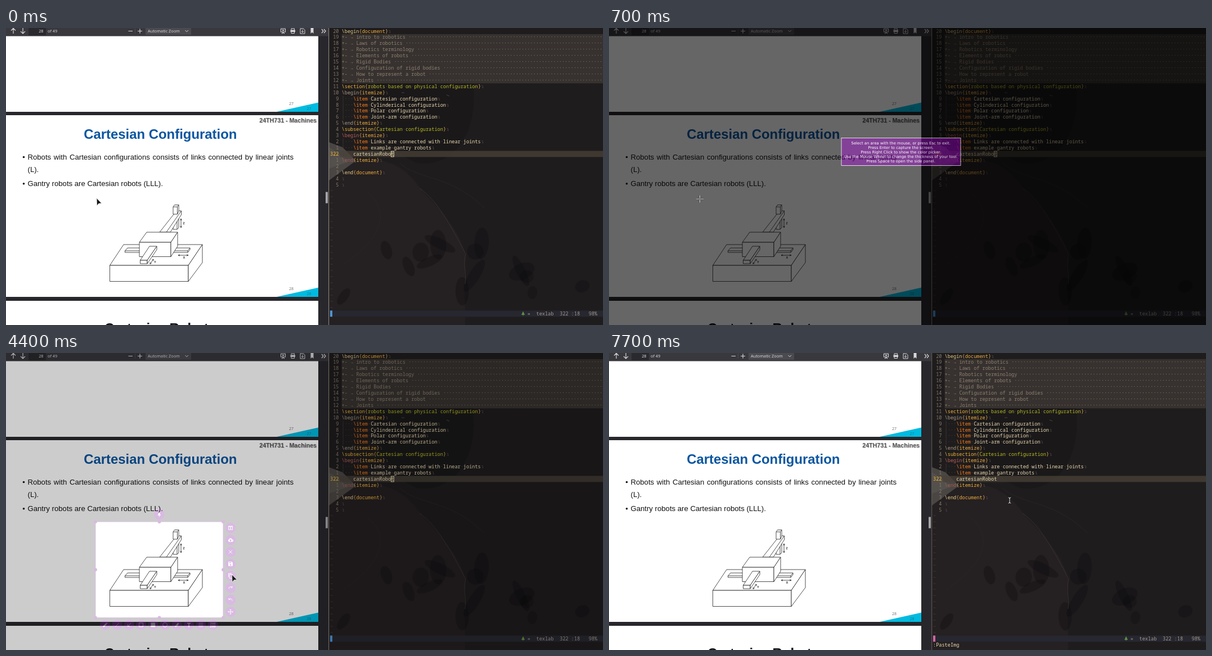
An HTML page with a canvas that plays this animation: 1061 by 528 pixels, repeating every 8000 ms.

```html
<!DOCTYPE html>
<html lang="en">
<head>
<meta charset="utf-8">
<title>Slides and notes</title>
<style>
html, body { margin: 0; width: 100%; height: 100%; overflow: hidden; background: #1e1b1c; }
canvas { display: block; }
</style>
</head>
<body>
<canvas id="stage" width="1061" height="528"></canvas>
<script>
const W = 1061, H = 528, LOOP = 8000;
const stage = document.getElementById('stage').getContext('2d');
const layer = document.createElement('canvas');
layer.width = W;
layer.height = H;
const over = layer.getContext('2d');
let g = stage;

const SANS = '"Liberation Sans", Arial, sans-serif';
const UI = '"Noto Sans", sans-serif';
const MONO = '8.59px "Noto Sans Mono", "DejaVu Sans Mono", monospace';
const PURPLE = '#740096';

function rect(x, y, w, h, color) {
  g.fillStyle = color;
  g.fillRect(x, y, w, h);
}
function text(s, x, y, font, color, align = 'left') {
  g.font = font;
  g.fillStyle = color;
  g.textAlign = align;
  g.fillText(s, x, y);
}
function poly(pts, fill, stroke, width = 1) {
  g.beginPath();
  for (let i = 0; i < pts.length; i += 2) g.lineTo(pts[i], pts[i + 1]);
  g.closePath();
  if (fill) { g.fillStyle = fill; g.fill(); }
  if (stroke) { g.strokeStyle = stroke; g.lineWidth = width; g.stroke(); }
}
function path(d, color, width = 1) {
  g.strokeStyle = color;
  g.lineWidth = width;
  g.stroke(new Path2D(d));
}
function disc(x, y, r, color) {
  g.fillStyle = color;
  g.beginPath();
  g.arc(x, y, r, 0, 7);
  g.fill();
}

// ---- slide viewer ----
function toolbar() {
  const c = '#d8d8da';
  rect(0, 0, 573, 14.5, '#38383d');
  rect(40, -2, 31, 15, '#2a2a2e');
  rect(248, -2, 81, 14, '#4a4a4f');
  path('M13 10V1M9 4.5L13 .5L17 4.5M30 0V9.5M26 6L30 10L34 6', c, 1.2);
  path('M217.5 5.5H225M234 5.5H242M238 1.5V9.5', c, 1.2);
  path('M229.5 1V10', '#55555a', 0.7);
  path('M318.5 4L321.2 6.8L324 4', c);
  path('M561 2L564 5.5L561 9M565 2L568 5.5L565 9', c, 1.2);
  text('28', 66.5, 8, '7.3px ' + UI, c, 'right');
  text('of 49', 74, 8, '7.3px ' + UI, c);
  text('Automatic Zoom', 252, 8, '7.3px ' + UI, c);
  path('M488.5 1.5H496.5V7H488.5ZM492.5 7V9M490 10L492.5 8L495 10', c, 1.1);
  poly([491.3, 2.5, 495, 4.3, 491.3, 6], c);
  path('M507 3.5V1H512.5V3.5M507 6.5H512.5V9.5H507Z', c);
  rect(505.5, 3.5, 8.5, 3.5, c);
  path('M523 1H528.5L531 3.5V10H523ZM527 3V8M525 6L527 8L529 6', c);
  poly([541.5, 0, 546.5, 0, 546.5, 10, 544, 7.5, 541.5, 10], c);
}
function justify(s, x, right, y, font) {
  g.font = font;
  const words = s.split(' ');
  const widths = words.map(w => g.measureText(w).width);
  const gap = (right - x - widths.reduce((a, b) => a + b)) / (words.length - 1);
  words.forEach((w, i) => {
    text(w, x, y, font, '#111', 'left');
    x += widths[i] + gap;
  });
}
function corner(n, bottom) {
  poly([481, bottom, 555, bottom - 16.5, 555, bottom], '#00bbe0');
  text(n, 507, bottom - 12, '7px ' + UI, '#777', 'center');
  text(n, 538.5, bottom - 3.5, '7px ' + UI, '#087f9c', 'center');
}
function robot() {
  const box = (...p) => poly(p, '#fff', '#222', 0.8);
  box(184.5, 422, 209, 385, 349, 385, 324, 422);
  box(184.5, 422, 324, 422, 324, 450.5, 184.5, 450.5);
  box(324, 422, 349, 385, 349, 417, 324, 450.5);
  box(211.5, 396, 216, 391, 238, 391, 238, 399, 211.5, 399);
  path('M211.5 396H238', '#222', 0.8);
  box(298, 396, 302, 391, 327, 391, 327, 394, 323, 399, 290, 399, 290, 396);
  path('M290 396H323V399M323 396L327 391', '#222', 0.8);
  box(297, 338, 307, 326, 307, 355, 304, 358, 297, 358);
  path('M304 330V358', '#222', 0.8);
  box(273, 363, 303, 325, 311.5, 325, 311.5, 332, 292, 363);
  path('M285 363L311.5 325', '#222', 0.8);
  box(297, 318, 299.5, 314.5, 307, 314.5, 307, 326, 304.5, 331, 297, 331);
  path('M297 318H304.5V331M304.5 318L307 314.5', '#222', 0.8);
  box(237, 381, 250, 363, 305, 363, 293, 381);
  box(237, 381, 293, 381, 293, 406.5, 237, 406.5);
  box(293, 381, 305, 363, 305, 388, 293, 406.5);
  box(238.5, 413, 255, 388, 268, 388, 251, 413);
  box(238.5, 413, 251, 413, 251, 419, 238.5, 419);
  box(251, 413, 268, 388, 268, 394, 251, 419);
  path('M311 339V355M309.8 342L311 339L312.2 342M309.8 352L311 355L312.2 352', '#222', 0.8);
  path('M306 404H324M309 402.8L306 404L309 405.2M321 402.8L324 404L321 405.2', '#222', 0.8);
  path('M256 419.5L262 411M256 416.5V419.5L258.7 418M259.5 412.5L262 411V414', '#222', 0.8);
  const f = 'bold 5px ' + SANS;
  text('Z', 316, 349, f, '#222', 'center');
  text('X', 316.5, 410, f, '#222', 'center');
  text('Y', 265, 418, f, '#222', 'center');
}
function slides() {
  rect(0, 0, 573, H, '#28272c');
  rect(0, 14, 555, 135, '#fff');
  rect(0, 155, 555, 323, '#fff');
  rect(0, 485, 555, 43, '#fff');
  rect(568, 291.5, 4, 20, '#a5a5a8');
  corner('27', 149);
  corner('28', 478);
  const head = '24TH731 - Machines', hf = 'bold 10.65px ' + SANS;
  text(head, 553, 169, hf, '#ccc', 'right');
  text(head, 552, 168.3, hf, '#555', 'right');
  text('Cartesian Configuration', 274.3, 196.5, 'bold 23.9px ' + SANS, '#0a56a0', 'center');
  const f = '13.15px ' + SANS;
  justify('Robots with Cartesian configurations consists of links connected by linear joints',
    38.5, 511, 233.8, f);
  text('(L).', 38.5, 256.3, f, '#111');
  text('Gantry robots are Cartesian robots (LLL).', 38.5, 281, f, '#111');
  disc(31.5, 229.5, 1.8, '#111');
  disc(31.5, 276.7, 1.8, '#111');
  robot();
  text('Cartesian Robots', 274, 542, 'bold 23.9px ' + SANS, '#111', 'center');
  toolbar();
}

// ---- editor ----
const CW = 5.155, LH = 10.92;
const col = c => 576 + c * CW;
const row = r => 5.5 + r * LH;
const mono = (s, c, r, color) => text(s, col(c), row(r) + 3, MONO, color);

const folds = ['intro to robotics', 'Laws of robotics', 'Robotics terminology',
  'Elements of robots', 'Rigid Bodies', 'Configuration of rigid bodies',
  'How to represent a robot', 'Joints'];
const code = {
  0: '\\begin{document}',
  9: '\\section{robots based on physical configuration}',
  10: '\\begin{itemize}',
  11: '\\item Cartesian configuration',
  12: '\\item Cylinderical configuration',
  13: '\\item Polar configuration',
  14: '\\item Joint-arm configuration',
  15: '\\end{itemize}',
  16: '\\subsection{Cartesian configuration}',
  17: '\\begin{itemize}',
  18: '\\item Links are connected with linear joints',
  19: '\\item example gantry robots',
  21: '\\end{itemize}',
  23: '\\end{document}',
  24: '',
  25: ''
};
const cmdColor = { 10: '#a89984', 15: '#a89984', 17: '#b9615a', 21: '#a25a56' };

function codeLine(s, r) {
  const item = s.startsWith('\\item');
  const start = item ? 8 : 4;
  if (s) {
    const [, cmd, rest] = s.match(/^(\\\w+)(.*)$/);
    const after = start + cmd.length;
    if (item) {
      mono('│···', 4, r, '#4a4441');
      mono(cmd, start, r, '#fe8019');
      mono(rest, after, r, '#ebdbb2');
    } else {
      const sect = cmd.endsWith('section');
      mono(cmd, start, r, sect ? '#f0b63a' : cmdColor[r] || '#e8cf8a');
      mono('{', after, r, '#d8a657');
      mono(rest.slice(1, -1), after + 1, r, sect ? '#b8bb26' : '#f0b040');
      mono('}', after + rest.length - 1, r, '#d8a657');
    }
    mono(s.replace(/./g, c => c === ' ' ? '·' : ' '), start, r, '#5a524c');
  }
  mono('↴', start + s.length, r, '#514a46');
}
function wallpaper() {
  rect(573, 0, 488, H, '#1f1c1d');
  g.fillStyle = '#252021';
  g.fill(new Path2D('M573 250C650 220 700 230 740 290C790 340 815 380 817 410C812 450 817 490 816 528H573Z'));
  g.fillStyle = '#1a1819';
  g.fill(new Path2D('M660 98C640 160 680 220 730 240C800 250 840 180 830 98Z'));
  let seed = 7;
  const rnd = () => (seed = seed * 16807 % 2147483647) / 2147483647;
  g.fillStyle = 'rgba(10,9,11,.28)';
  for (let i = 0; i < 16; i++) {
    g.beginPath();
    g.ellipse(600 + rnd() * 460, 330 + rnd() * 160, 10 + rnd() * 24, 6 + rnd() * 9, rnd() * 3, 0, 7);
    g.fill();
  }
  path('M735 285C765 305 790 350 817 402C812 420 818 430 816 455', '#373031', 1);
  path('M640 290C690 330 660 380 600 420M700 240C730 270 790 260 850 320', '#2a2526', 1);
  path('M703 115H708M783 119L788 121', '#4c4543', 1);
  poly([574, 203, 598, 212, 622, 236, 600, 252, 574, 271], '#4a4643');
  poly([574, 212, 590, 222, 608, 238, 574, 250], '#54504c');
}
function editor(t) {
  const focused = t >= 5300, command = t >= 6600;
  wallpaper();
  rect(573, 0, 1.2, H, focused ? '#5c554e' : '#858078');
  rect(col(4), row(0.5), W, 8 * LH, '#37322f');
  rect(col(3.3), row(19.5), W, LH, 'rgba(72,66,56,.75)');

  for (let r = 0; r < 26; r++) {
    const here = r === 20;
    text(here ? 322 : Math.abs(20 - r), col(3), row(r) + 3, MONO, here ? '#fabd2f' : '#857a6c', 'right');
    if (r in code) codeLine(code[r], r);
  }
  for (let r = 26; r < 46; r++) mono('~', 0, r, '#4a4340');
  folds.forEach((s, i) => {
    const c = '#8d8172', end = 9 + s.length;
    mono('+-', 4, i + 1, c);
    mono('→', 7, i + 1, c);
    mono(s, 9, i + 1, c);
    mono('·'.repeat(95 - end), end + 1, i + 1, c);
  });
  mono('│', 4, 20, '#4a4441');
  mono('cartesianRobot', 8, 20, '#ebdbb2');

  const x = col(21), y = row(19.5);
  if (!focused) {
    g.strokeStyle = '#ebdbb2';
    g.lineWidth = 1;
    g.strokeRect(x + 0.2, y + 0.7, CW - 0.4, LH - 1.2);
  } else if (t < 5800 || (t >= 6200 && !command)) {
    rect(x, y, CW, LH, '#f2e9d5');
    mono('t', 21, 20, '#282828');
  }

  rect(575, 502.3, W, 11, '#272730');
  rect(576, 502.3, 4, 11, command ? '#d067a4' : '#4f94d4');
  poly([919, 503.5, 922, 510, 916, 510], '#5f8f4a');
  rect(918.5, 510, 1, 1.5, '#5f8f4a');
  const sf = '#a39a8d', sy = 510.5;
  text('∝', 926.5, sy, MONO, sf);
  text('texlab', 942.5, sy, MONO, sf);
  text('322 :18', 984, sy, MONO, sf);
  text('98%', 1035.5, sy, MONO, sf);
  if (command) {
    const s = t < 7000 ? ':' : ':PasteImg';
    text(s, 576, 521.5, MONO, '#ebdbb2');
    if (t < 7700) rect(col(s.length), 513.3, CW, LH, '#f2e9d5');
  }
}

// ---- screenshot tool ----
const help = ['Select an area with the mouse, or press Esc to exit.',
  'Press Enter to capture the screen.',
  'Press Right Click to show the color picker.',
  'Use the Mouse Wheel to change the thickness of your tool.',
  'Press Space to open the side panel.'];

// icons on a 24 unit grid: f = filled, s = stroked
const pin = 'fM8 3h8v2h-1v6l3 3v2h-5v6l-1 1-1-1v-6H6v-2l3-3V5H8z';
const sideIcons = [
  'fM3 4h18v16H3zM5 8v10h14V8zM12 9l4 4h-3v4h-2v-4H8z',
  'fM19 10a7 7 0 0 0-13-1a6 6 0 0 0 0 11h13a5 5 0 0 0 0-10zM12 9l5 5h-3v4h-4v-4H7z',
  'sM5 5L19 19M19 5L5 19',
  'fM3 3h14l4 4v14H3zM6 5v4h9V5zM12 13a3 3 0 1 0 .1 0z',
  'sM8 6h12v16H8zM4 17V2h12',
  'sM19 5v6h-6M18 10c-5-5-12-3-13 6',
  'sM5 5v6h6M6 10c5-5 12-3 13 6',
  'sM12 2v20M2 12h20M9 5l3-3 3 3M9 19l3 3 3-3M5 9l-3 3 3 3M19 9l3 3-3 3'];
const drawIcons = [
  'fM3 21v-4L15 5l4 4L7 21zM16 4l2-2 4 4-2 2z',
  'sM5 19L19 5',
  'sM19 5L6 18M6 9v9h9',
  'sM4 4h16v16H4z',
  'fM3 3h18v18H3z',
  'sM12 3a9 9 0 1 0 .1 0z',
  'fM4 20l2-6 5 4-2 2zM7 13L16 3l5 4-8 10z',
  'fM5 4h14v4h-5v13h-4V8H5z',
  'pM4 4h16v16H4zM9 4v16M15 4v16M4 9h16M4 15h16',
  ''];

function button(x, y, icon, size) {
  g.save();
  g.translate(x, y);
  g.scale(size, size);
  disc(0, 0, 9.2, PURPLE);
  if (icon) {
    const p = new Path2D(icon.slice(1));
    g.scale(0.43, 0.43);
    g.translate(-12, -12);
    g.fillStyle = g.strokeStyle = icon[0] === 'p' ? 'rgba(255,255,255,.45)' : '#fff';
    g.lineWidth = 2.2;
    if (icon[0] === 'f') g.fill(p, 'evenodd');
    else g.stroke(p);
  } else {
    text('398', 0, -0.5, 'bold 6px ' + SANS, '#fff', 'center');
    text('299', 0, 5, 'bold 6px ' + SANS, '#fff', 'center');
  }
  g.restore();
}
function selection(x, y, w, h) {
  g.clearRect(x, y, w, h);
  g.strokeStyle = PURPLE;
  g.lineWidth = 0.8;
  g.strokeRect(x, y, w, h);
  for (let i = 0; i < 3; i++)
    for (let j = 0; j < 3; j++)
      if (i !== 1 || j !== 1) disc(x + w * i / 2, y + h * j / 2, 2.9, PURPLE);
}
function helpBox() {
  rect(413, 195.5, 212, 49, 'rgba(116,0,150,.706)');
  g.strokeStyle = '#fff';
  g.lineWidth = 0.8;
  g.strokeRect(413, 195.5, 212, 49);
  help.forEach((s, i) =>
    text(s, 518.7, 206.8 + i * 8, '6.85px "DejaVu Sans", sans-serif', '#fff', 'center'));
}
// eased drag position from 1100 to 1700 ms
function drag(t, kx, ky) {
  const p = Math.min(1, Math.max(0, (t - 1100) / 600));
  return [159 + 227 * (1 - (1 - p) ** kx), 300 + 170.5 * (1 - (1 - p) ** ky)];
}
function capture(t) {
  g = over;
  g.clearRect(0, 0, W, H);
  rect(0, 0, W, H, 'rgba(0,0,0,.745)');
  if (t < 1100) helpBox();
  else {
    const [x, y] = drag(t, 1.76, 2.78);
    selection(159, 300, x - 159, y - 300);
  }
  if (t >= 2300) {
    const size = Math.min(1, 0.35 + (t - 2300) / 100 * 0.35);
    button(272.3, 287, pin, size);
    sideIcons.forEach((d, i) => button(399, 311 + i * 21.3, d, size));
    drawIcons.forEach((d, i) => button(176.3 + i * 21.25, 483.3, d, size));
  }
  g = stage;
  g.globalAlpha = t >= 4400 ? 0.268 : Math.min(1, (t - 400) / 100 * 0.268);
  g.drawImage(layer, 0, 0);
  g.globalAlpha = 1;
}

// ---- pointer ----
function arrow(x, y) {
  poly([x, y, x + 0.6, y + 13.5, x + 3.8, y + 9.6, x + 9, y + 9.2], '#16161a', '#eee', 0.8);
}
function cross(x, y) {
  const d = `M${x - 6.5} ${y}h5m3 0h5M${x} ${y - 6.5}v5m0 3v5`;
  path(d, 'rgba(30,30,30,.8)', 2.4);
  path(d, '#f2f2f2', 1.1);
  rect(x - 0.5, y - 0.5, 1, 1, '#f2f2f2');
}
function pointer(t) {
  if (t < 500) arrow(161, 302.5);
  else if (t < 1100) cross(161.5, 304);
  else if (t < 2300) cross(...drag(t, 2.45, 3.04));
  else if (t < 4400) arrow(391, 456.5);
  else if (t < 5300) arrow(401.5, 394);
  else {
    const d = 'M709.7 256.8Q712 257 712 258.5Q712 257 714.3 256.8M712 258V266M709.7 267.2Q712 267 712 265.5Q712 267 714.3 267.2';
    path(d, '#111', 2.4);
    path(d, '#eee', 1);
  }
}

function draw(now) {
  const t = Math.floor(now % LOOP / 100) * 100;
  editor(t);
  slides();
  if (t >= 500 && t < 4500) capture(t);
  pointer(t);
  requestAnimationFrame(draw);
}
requestAnimationFrame(draw);
</script>
</body>
</html>
```
